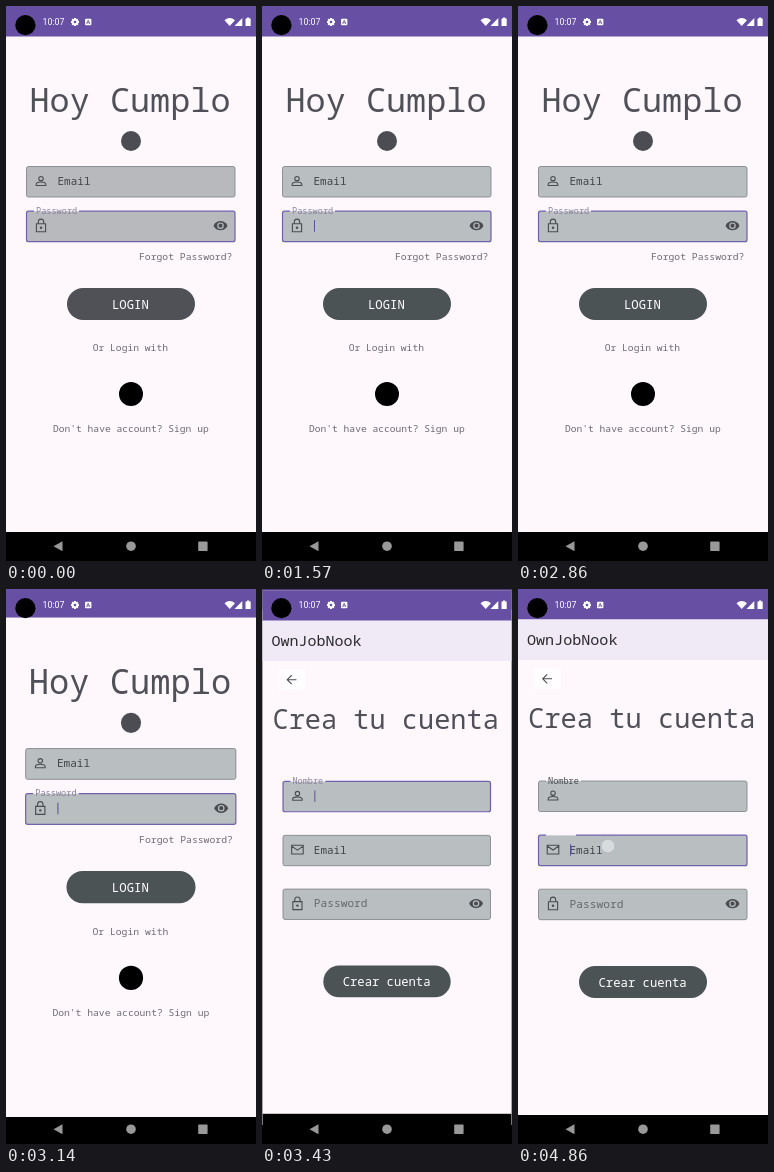
Recreate the animation shown at these times as an HTML page. Size 250x555 px, loop 5000 ms.

```html
<!DOCTYPE html>
<html lang="es">
<head>
<meta charset="utf-8">
<title>Login</title>
<style>
  html, body { margin: 0; width: 100%; height: 100%; overflow: hidden; background: #000; }
  svg { display: block; width: 250px; height: 555px; }
  text { font-family: "Noto Sans Mono", "Liberation Mono", monospace; font-weight: 300; white-space: pre; }
  .clock { font-family: Roboto, sans-serif; font-weight: 400; }
</style>
</head>
<body>
<svg id="stage" viewBox="0 0 250 555"></svg>
<script>
const LOOP = 5000, STEP = 1000 / 7;
const BG = '#fef8fd', PURPLE = '#674fa3';
const INK = '#505058', SOFT = '#6b6b72', DARK = '#414449', ICON = '#4a4c51';
const stage = document.getElementById('stage');

const lerp = (a, b, k) => a + (b - a) * k;
const clamp = v => Math.max(0, Math.min(1, v));
const mix = (a, b, k) => `rgb(${a.map((v, i) => Math.round(lerp(v, b[i], k)))})`;
const between = (t, a, b) => t >= a && t < b;

// Monospaced text: size follows from the advance of one character.
const mono = (s, x, y, advance, fill = INK) =>
  `<text x="${x}" y="${y}" font-size="${(advance / 0.6).toFixed(2)}" fill="${fill}">${s}</text>`;
const rect = (x, y, w, h, fill, r = 0) =>
  `<rect x="${x}" y="${y}" width="${w}" height="${h}" rx="${r}" fill="${fill}"/>`;
const disc = (x, y, r, fill) => `<circle cx="${x}" cy="${y}" r="${r}" fill="${fill}"/>`;
const line = (d, color = ICON, w = 1.1) =>
  `<path d="${d}" fill="none" stroke="${color}" stroke-width="${w}"/>`;
const at = (x, y, body) => `<g transform="translate(${x} ${y})">${body}</g>`;
const zoom = (k, body) =>
  `<g transform="translate(125 277.5) scale(${k}) translate(-125 -277.5)">${body}</g>`;

const icons = {
  person: line('M-4.8 4.6V3.4C-4.8 .4 4.8 .4 4.8 3.4V4.6Z') +
    `<circle cy="-2.2" r="2.2" fill="none" stroke="${ICON}" stroke-width="1.1"/>`,
  lock: line('M-4.6 -1.8H4.6V6.2H-4.6ZM-2.7 -1.8V-3.6C-2.7 -7.4 2.7 -7.4 2.7 -3.6V-1.8') +
    disc(0, 2.2, 1.2, ICON),
  mail: line('M-5.8 -4.4H5.8V4.4H-5.8ZM-5.8 -3.6L0 .4L5.8 -3.6'),
  eye: `<path d="M-7 0C-4.4 -6.2 4.4 -6.2 7 0C4.4 6.2 -4.4 6.2 -7 0Z" fill="${ICON}"/>` +
    `<circle r="2.7" fill="${ICON}" stroke="#b9bec0" stroke-width="1.2"/>`
};

function field(y, icon, o) {
  const top = y + 0.5, bottom = y + 31, color = o.focus ? '#7061ac' : '#85888b';
  const start = o.notch || 28;
  const border = `M${start} ${top}H227Q229 ${top} 229 ${top + 2}V${bottom - 2}Q229 ${bottom} 227 ${bottom}` +
    `H22.5Q20.5 ${bottom} 20.5 ${bottom - 2}V${top + 2}Q20.5 ${top} 22.5 ${top}H28`;
  return rect(20.5, top, 208.5, 30.5, o.fill, 2) +
    line(border, color, o.focus ? 1.2 : 0.9) +
    (o.notch ? line(`M28 ${y}H${start}`, BG, 1) : '') +
    at(35, y + 14.9, icons[icon]) +
    (o.label ? mono(o.label, 30, y + 3, 5.15, o.labelInk) : '') +
    (o.text ? mono(o.text, 51.5, y + 19, o.advance || 6.6, o.ink || DARK) : '') +
    (o.eye ? at(214.5, y + 15, icons.eye) : '') +
    (o.cursor ? rect(52, y + 9.5, 1, 11.5, '#5d4f98') : '');
}

const button = (y, label, x, fill) =>
  rect(61, y, 128, 32, fill, 16) + mono(label, x, y + 20.5, 7.35, '#fff');

const page = body => rect(0, 0, 250, 555, '#000') + rect(0, 0, 250, 526, BG) +
  rect(0, 0, 250, 30.5, PURPLE) + body;

function login(t) {
  const k = clamp(t / 800);
  const fill = mix([184, 185, 189], [185, 190, 192], k);
  const dark = mix([80, 81, 87], [76, 83, 85], k);
  const blink = between(t % 1000, 130, 630);
  return page(
    mono('Hoy Cumplo', 23.5, 106, 20.1) +
    disc(125, 135, 10, '#4b4d53') +
    field(160, 'person', { fill, text: 'Email' }) +
    field(204.7, 'lock', { fill, focus: true, notch: 73, label: 'Password',
      labelInk: '#87819c', eye: true, cursor: blink }) +
    mono('Forgot Password?', 133, 254, 5.83, SOFT) +
    button(282, 'LOGIN', 106, dark) +
    mono('Or Login with', 86.7, 345, 5.8, SOFT) +
    disc(125, 388, 12, '#000') +
    mono('Don\'t have account? Sign up', 47, 426, 5.77, SOFT));
}

function signup(t) {
  const fill = '#b9bec0', moved = t >= 4850;
  const blink = t < 3750 || between(t, 4250, 4750);
  return page(
    rect(0, 30.5, 250, 40.5, '#f0e9f6') +
    mono('OwnJobNook', 9, 55.5, 9.05, '#2b2b2e') +
    rect(16, 79.5, 26.5, 20, '#fffdff', 1) +
    line('M34 89.8H25M29.2 85.3L24.7 89.8L29.2 94.3') +
    mono('Crea tu cuenta', 10, 139, 16.25) +
    field(191.5, 'person', { fill, focus: !moved, notch: 63, label: 'Nombre',
      labelInk: moved ? '#46464c' : '#87819c', cursor: blink && !moved }) +
    field(245.7, 'mail', { fill, focus: moved, notch: moved ? 58 : 0, text: 'Email', cursor: moved }) +
    field(299.7, 'lock', { fill, text: 'Password', advance: 6.75, ink: '#64696d', eye: true }) +
    button(377, 'Crear cuenta', 80.5, '#4c5355'));
}

function gear(x, y) {
  let teeth = '';
  for (let i = 0; i < 4; i++)
    teeth += `<rect x="-1" y="-4" width="2" height="8" fill="#fff" transform="rotate(${i * 45})"/>`;
  return at(x, y, teeth + disc(0, 0, 3, '#fff') + disc(0, 0, 1.3, PURPLE));
}

const systemBars = disc(19.4, 19.2, 10.1, '#000') +
  '<text class="clock" x="36.5" y="19.3" font-size="8.8" fill="#fff">10:07</text>' +
  gear(69, 16) + rect(79, 12.8, 6.4, 6.4, '#fff', 1) +
  line('M80.6 18L82.2 14.2L83.8 18M81.2 16.8H83.2', PURPLE, 0.8) +
  '<path d="M218.5 14.2Q223.7 10 229 14.2L223.7 20ZM236.3 12V20H228.5ZM239.5 12.5H241V11.5H243.2V12.5H244.7V20H239.5Z" fill="#fff"/>' +
  '<path d="M56.5 535.2V545.2L47.5 540.2Z" fill="#999"/>' +
  disc(125, 540.2, 4.8, '#999') + rect(192.2, 535.6, 9.4, 9.4, '#999', 0.8);

const touch = (x, y) =>
  `<circle cx="${x}" cy="${y}" r="6.8" fill="#fff" fill-opacity=".45" stroke="#b9b4c4" stroke-opacity=".75" stroke-width=".9"/>`;

function scene(t) {
  if (t < 3200) {
    const grow = t > 3100 ? 1.008 : 1;
    return zoom(grow, login(t)) + (between(t, 2250, 2800) ? touch(182, 422) : '');
  }
  // The new page settles over the dimmed, receding one.
  const rest = Math.pow(clamp((3700 - t) / 415), 3);
  const back = rest > 0
    ? zoom(1.04, login(3200)) + '<rect width="250" height="555" fill-opacity=".23"/>' : '';
  return back + zoom(1 - 0.0175 * rest, signup(t)) + (t > 4560 ? touch(90, 257) : '');
}

let shown = -1;
function tick() {
  const step = Math.floor((performance.now() % LOOP + 4) / STEP) % 35;
  if (step !== shown) {
    shown = step;
    stage.innerHTML = scene(step * STEP) + systemBars;
  }
  requestAnimationFrame(tick);
}
tick();
</script>
</body>
</html>
```
